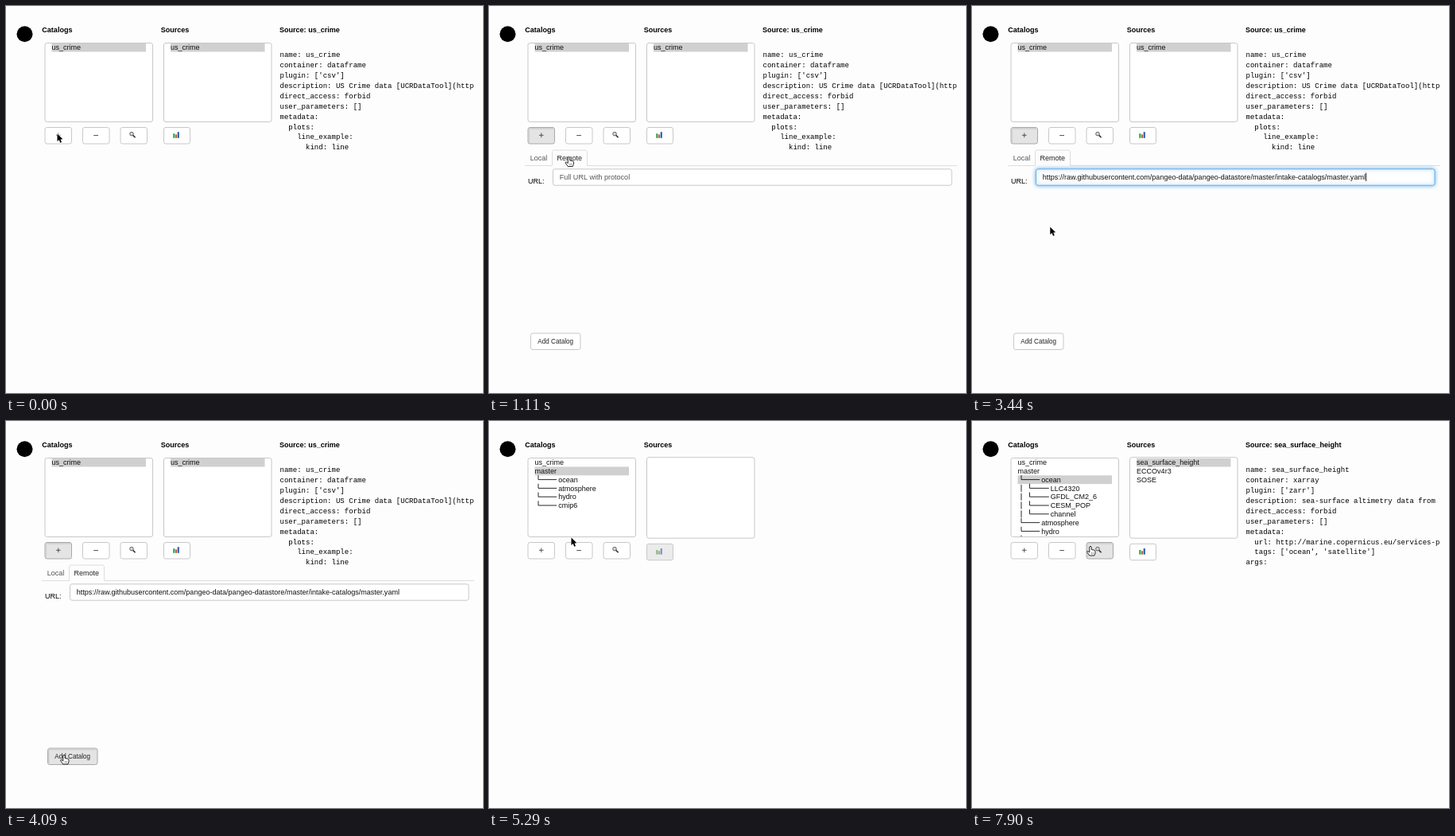
Write an HTML page with a canvas that moves like this. It is 600x486 px and loops after 7990 ms.

```html
<!DOCTYPE html>
<html lang="en">
<head>
<meta charset="utf-8">
<title>Catalog browser</title>
<style>
html, body { margin: 0; width: 100%; height: 100%; overflow: hidden; background: #fdfdfd; }
canvas { display: block; }
</style>
</head>
<body>
<canvas id="stage" width="600" height="486"></canvas>
<script>
const ctx = document.getElementById('stage').getContext('2d');
const LOOP = 7990;
const SANS = '"Liberation Sans", Arial, sans-serif';
const MONO = '"Liberation Mono", "Courier New", monospace';
const ROW = 10.8;
const BG = '#fdfdfd', BORDER = '#c8c8c8', BLUE = '#0b58d8', GREY = '#d0d0d0';
const ADDRESS = 'https://raw.githubusercontent.com/pangeo-data/pangeo-datastore/master/intake-catalogs/master.yaml';

// Moments at which the interface reacts
const T = { press: 190, panel: 370, remote: 1110, focus: 1760, caret: 1850, paste: 2600,
  submit: 4090, release: 4270, added: 4360, close: 4740, pick: 5940, expand: 7430, search: 7900 };

const crimeInfo = [
  'name: us_crime', 'container: dataframe', "plugin: ['csv']",
  'description: US Crime data [UCRDataTool](http', 'direct_access: forbid',
  'user_parameters: []', 'metadata:', '  plots:', '    line_example:', '      kind: line'];
const seaInfo = [
  'name: sea_surface_height', 'container: xarray', "plugin: ['zarr']",
  'description: sea-surface altimetry data from The', 'direct_access: forbid',
  'user_parameters: []', 'metadata:', '  url: http://marine.copernicus.eu/services-po',
  "  tags: ['ocean', 'satellite']", 'args:'];

const flat = ['us_crime'];
const tree = ['us_crime', 'master', '-ocean', '-atmosphere', '-hydro', '-cmip6'];
const opened = ['us_crime', 'master', '-ocean', '--LLC4320', '--GFDL_CM2_6', '--CESM_POP',
  '--channel', '-atmosphere', '-hydro', '-cmip6'];

// Pointer moves: first step, last step, step count, end point
const home = [64.5, 160.5];
const moves = [
  [650, 930, 4, 100.5, 189.5], [1300, 1580, 4, 110, 212], [3250, 3900, 8, 73, 419],
  [4740, 5290, 7, 103.5, 146.5], [5570, 5760, 3, 102, 73], [7430, 7800, 5, 149, 157]];

const arrow = new Path2D('M0 0V9.6L2.2 7.6 3.8 11.2 5.5 10.4 4 7 6.9 6.8Z');
const hand = new Path2D('M-1.2 1Q0-.8 1.2 1V4.4L5 5.2Q6 5.6 6 6.6V9L4.8 12H-1.2L-4.4 7.6Q-4.4 6-3 6.6L-1.2 8Z');

function text(str, x, y, color = '#111', size = 9.04, weight = 'normal', family = SANS) {
  ctx.font = `${weight} ${size}px ${family}`;
  ctx.fillStyle = color;
  ctx.fillText(str, x, y);
}

function line(color, width, ...pts) {
  ctx.beginPath();
  for (let i = 0; i < pts.length; i += 2) ctx.lineTo(pts[i], pts[i + 1]);
  ctx.strokeStyle = color;
  ctx.lineWidth = width;
  ctx.stroke();
}

function box(x, y, w, h, fill = '#fff', stroke = BORDER, glow = 0) {
  ctx.save();
  ctx.beginPath();
  ctx.roundRect(x, y, w, h, 2.5);
  if (glow) {
    ctx.shadowColor = `rgba(102,175,233,${glow})`;
    ctx.shadowBlur = 5;
  }
  ctx.fillStyle = fill;
  ctx.fill();
  ctx.strokeStyle = stroke;
  ctx.lineWidth = 1;
  ctx.stroke();
  ctx.restore();
}

function button(x, y, w, h, state) {
  const fill = { down: '#e4e4e4', hover: '#e8e8e8', off: '#ebebeb' }[state] || '#fff';
  box(x, y, w, h, fill, state === 'down' || state === 'hover' ? '#a8a8a8' : BORDER);
  if (state === 'down') line('#d0d0d0', 1.6, x + 1.3, y + h - 1, x + 1.3, y + 1.4, x + w - 1, y + 1.4);
}

function lens(x, y) {
  line('#333', 1.6, x + 1.5, y + 1.5, x + 4.6, y + 4.6);
  ctx.beginPath();
  ctx.arc(x, y, 2.3, 0, 7);
  ctx.fillStyle = '#c9dbe6';
  ctx.fill();
  ctx.strokeStyle = '#555';
  ctx.lineWidth = 0.9;
  ctx.stroke();
}

function chart(y, off) {
  ctx.save();
  ctx.globalAlpha = off ? 0.6 : 1;
  [['#23a03c', 5.6], ['#c8642d', 4.4], ['#2458b8', 7.6]].forEach(([color, h], i) => {
    ctx.fillStyle = color;
    ctx.fillRect(210.3 + i * 2.7, y - h, 2.1, h);
  });
  ctx.restore();
}

function list(x, y, h, rows, picked, focus) {
  box(x, y, 135.5, h, '#fff', focus ? '#66afe9' : BORDER, focus ? 1 : 0);
  ctx.save();
  ctx.beginPath();
  ctx.rect(x + 1, 46.5, 133.5, y + h - 47);
  ctx.clip();
  rows.forEach((row, i) => {
    const mid = 52 + i * ROW;
    const depth = row.lastIndexOf('-') + 1;
    const active = i === picked;
    if (active) {
      ctx.fillStyle = focus ? BLUE : GREY;
      ctx.fillRect(x + 8.5, mid - 5.3, 118.5, ROW);
    }
    const ink = active && focus ? '#fff' : '#111';
    let left = x + 8.5;
    if (depth) {
      const bend = depth > 1 ? 72.5 : 62;
      left = depth > 1 ? 98.8 : 87.2;
      line(ink, 0.9, bend, mid - 5.6, bend, mid, left - 2, mid);
      if (depth > 1) line(ink, 0.9, 62, mid - 4.5, 62, mid + 4.5);
    }
    text(row.slice(depth), left, mid + 3.1, ink);
  });
  ctx.restore();
}

function info(title, rows) {
  ctx.save();
  ctx.beginPath();
  ctx.rect(340, 0, 249, 486);
  ctx.clip();
  text('Source: ' + title, 344, 33.3, '#000', 9.04, 'bold');
  rows.forEach((row, i) => text(row, 344.5, 64.2 + i * 12.9, '#000', 9.04, 'normal', MONO));
  ctx.restore();
}

function tabs(remote) {
  const [a, b] = remote ? [79.5, 123.5] : [45.5, 79.5];
  line('#ddd', 1, 45, 200.5, a, 200.5, a, 182.5, a + 1.5, 181, b - 1.5, 181, b, 182.5, b, 200.5, 589, 200.5);
  text('Local', 51.7, 194.2, remote ? '#555' : '#222');
  text('Remote', 85.4, 194.2, remote ? '#222' : '#555');
}

function caretOn(t) {
  if (t < T.paste) return t >= T.caret && !(t >= 2140 && t < 2410);
  return t < 2970 || (t >= 3340 && t < 3710);
}

function addPanel(t, over) {
  const remote = t >= T.remote;
  tabs(remote);
  if (remote) {
    const focused = t >= T.focus && t < T.submit;
    const glow = focused ? Math.min(1, (1 + Math.floor((t - T.focus) / 95)) / 3) : 0;
    text('URL:', 49, 223, '#000');
    box(80.5, 204.8, 501.5, 20.4, '#fff', focused ? '#66afe9' : BORDER, glow);
    const pasted = t >= T.paste;
    text(pasted ? ADDRESS : 'Full URL with protocol', 88.8, 218.1, pasted ? '#111' : '#555');
    if (focused && caretOn(t)) {
      const x = pasted ? 495.7 : 89.3;
      line('#111', 0.9, x, 209.5, x, 220);
    }
  } else {
    box(49, 204.8, 135.5, 20.4);
    box(49, 235, 135.5, 162);
  }
  const down = t >= T.submit && t < T.release;
  button(52.5, 411, 62.5, 20.5, down ? 'down' : over ? 'hover' : '');
  text('Add Catalog', 61.3, 424, '#222', 8.15);
}

function pointer(t) {
  let [x, y] = home;
  for (const [start, end, n, tx, ty] of moves) {
    if (t < start) break;
    const step = Math.min(n, 1 + Math.floor((t - start) / ((end - start) / (n - 1)) + 0.01));
    const k = step / n, e = k * k * (3 - 2 * k);
    x += (tx - x) * e;
    y += (ty - y) * e;
  }
  return [x, y];
}

function drawPointer(t, x, y, overButton) {
  if (t >= T.paste && t < 3250) return;
  const panel = t >= T.panel && t < T.close;
  ctx.save();
  ctx.translate(x, y);
  ctx.lineJoin = 'round';
  if (panel && t >= T.remote && x > 80 && y > 204 && y < 226) {
    line('#222', 1, -2, -5, 0, -4, 2, -5);
    line('#222', 1, 0, -4, 0, 4.5);
    line('#222', 1, -2, 5.5, 0, 4.5, 2, 5.5);
  } else if (overButton || (panel && y > 180 && y < 201)) {
    ctx.fillStyle = '#fff';
    ctx.fill(hand);
    ctx.strokeStyle = '#111';
    ctx.lineWidth = 0.9;
    ctx.stroke(hand);
    line('#444', 0.6, 1.3, 8, 1.3, 10.5);
    line('#444', 0.6, 3.3, 8, 3.3, 10.5);
  } else {
    ctx.strokeStyle = '#fff';
    ctx.lineWidth = 1.4;
    ctx.stroke(arrow);
    ctx.fillStyle = '#000';
    ctx.fill(arrow);
  }
  ctx.restore();
}

function draw(t) {
  const [x, y] = pointer(t);
  const panel = t >= T.panel && t < T.close;
  const overAdd = panel && x > 52 && x < 115 && y > 411 && y < 432;
  const overTools = y > 152 && y < 174 && x < 178 && t >= T.press && (x < 83 || x > 144);
  const bare = t >= T.close && t < T.expand;

  ctx.fillStyle = BG;
  ctx.fillRect(0, 0, 600, 486);
  ctx.fillStyle = '#000';
  ctx.beginPath();
  ctx.arc(23.5, 35.3, 10, 0, 7);
  ctx.fill();

  text('Catalogs', 45.3, 33.3, '#000', 9.04, 'bold');
  text('Sources', 194.7, 33.3, '#000', 9.04, 'bold');

  const rows = t < T.added ? flat : t < T.expand ? tree : opened;
  const picked = t < T.added ? 0 : t < T.pick ? 1 : 2;
  list(49, 46.5, 99, rows, picked, t >= T.pick && t < T.search);

  if (t < T.close) list(198.5, 46.5, 99, flat, 0);
  else list(198.5, 45.7, 101.5, bare ? [] : ['sea_surface_height', 'ECCOv4r3', 'SOSE'], 0);

  button(49, 152.5, 33.5, 20.5, t >= T.press && t < T.close ? 'down' : '');
  button(96.5, 152.5, 33.5, 20.5);
  button(144, 152.5, 33.5, 20.5, t >= T.search ? 'down' : overTools && x > 144 ? 'hover' : '');
  line('#444', 0.9, 63, 162.3, 68.6, 162.3);
  line('#444', 0.9, 65.8, 159.5, 65.8, 165.1);
  line('#444', 0.9, 110.2, 162.5, 116, 162.5);
  lens(158, 160.6);

  const top = t < T.close ? 152.5 : 154.3;
  button(198.5, top, 33, 20.5, bare ? 'off' : '');
  chart(top + 13.3, bare);

  if (t < T.close) info('us_crime', crimeInfo);
  else if (!bare) info('sea_surface_height', seaInfo);
  if (panel) addPanel(t, overAdd);

  drawPointer(t, x, y, overAdd || overTools);
}

const begin = performance.now();
function tick() {
  draw((performance.now() - begin) % LOOP);
  requestAnimationFrame(tick);
}
tick();
</script>
</body>
</html>
```
